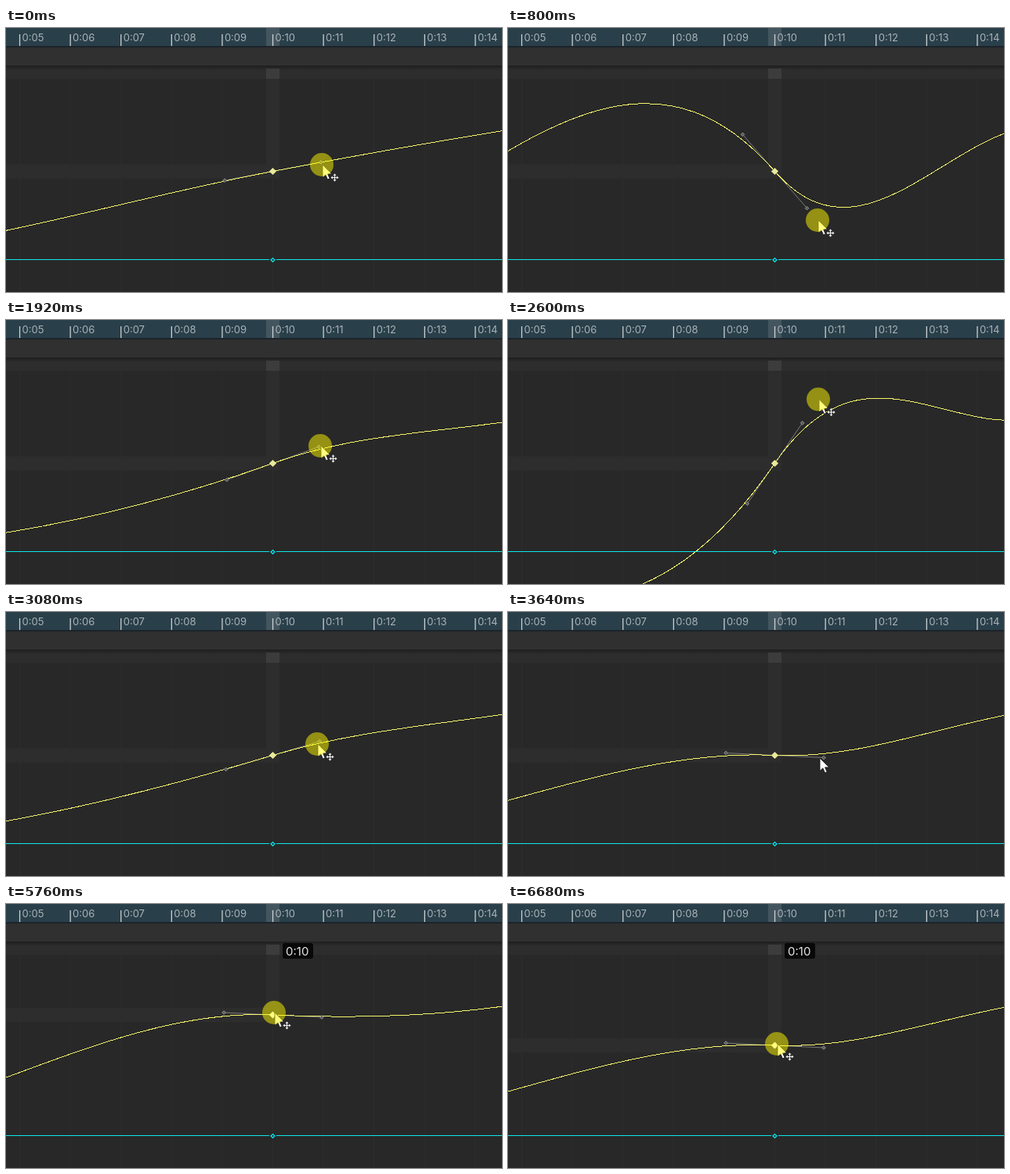
Animation, 633 px wide and 338 px high, one loop 6920 ms. Source, as an HTML page:

```html
<!DOCTYPE html>
<html lang="en">
<head>
<meta charset="utf-8">
<title>Automation curve</title>
<style>
html, body { margin: 0; width: 100%; height: 100%; overflow: hidden; background: #282828; }
svg { display: block; width: 633px; height: 338px; }
text { font-family: Inter, Roboto, sans-serif; }
.thin { fill: none; stroke-width: 1; }
</style>
</head>
<body>
<svg id="stage" viewBox="0 0 633 338" xmlns="http://www.w3.org/2000/svg">
  <defs>
    <linearGradient id="shade" x2="0" y2="1">
      <stop offset="0" stop-color="#1e1e1e"/>
      <stop offset="1" stop-color="#2d2d2d"/>
    </linearGradient>
  </defs>
  <rect width="633" height="338" fill="#282828"/>
  <rect id="row" width="349" height="18" fill="#2d2d2d"/>
  <rect id="col" x="332" y="65" width="17" fill="#2d2d2d"/>
  <g id="grid"></g>
  <rect y="48" width="633" height="17" fill="#2d2d2d"/>
  <rect y="48" width="633" height="6" fill="url(#shade)"/>
  <rect x="332" y="52" width="17" height="13" fill="#3c3c3c"/>
  <rect y="24" width="633" height="24" fill="#303030"/>
  <rect width="633" height="23" fill="#293f4a"/>
  <rect x="332" width="17" height="23" fill="#435660"/>
  <rect y="23" width="633" height="2" fill="#1c2429"/>
  <g id="ruler" font-size="13" fill="#a9b2b7"></g>

  <rect y="296" width="633" height="1" fill="#0ee6ec"/>
  <path d="M335.5 297l5-5 5 5-5 5z" fill="#282828"/>
  <path d="M338 297l2.5-2.5 2.5 2.5-2.5 2.5z" fill="#123c3e" stroke="#0ee6ec" stroke-width="1.2"/>

  <path id="bar" class="thin" stroke="#7c7c7c"/>
  <path id="curve" class="thin" stroke="#f6f66a" shape-rendering="crispEdges"/>
  <g fill="#555" stroke="#999">
    <path id="left" d="M-2.3 0L0-2.3 2.3 0 0 2.3z"/>
    <path id="right" d="M-2.3 0L0-2.3 2.3 0 0 2.3z"/>
  </g>
  <path id="key" d="M-4.6 0L0-4.6 4.6 0 0 4.6z"/>

  <g id="tip">
    <rect x="353" y="50" width="39" height="20" rx="3" fill="#080808"/>
    <text x="357" y="66" font-size="15" fill="#e4e4e4">0:10</text>
  </g>
  <g id="cursor">
    <path d="M1 0v16.5l3.8-3.6 2.7 6 2.7-1.2-2.6-5.8h5.2z" fill="#fff" stroke="#161616" stroke-width=".9"/>
    <g id="move">
      <path d="M16.5 11l2.6 3h-1.7v1.6H19V14l3 2.5-3 2.6v-1.7h-1.6V19h1.7l-2.6 3-2.6-3h1.7v-1.6H14v1.7l-3-2.6 3-2.5v1.6h1.6V14h-1.7z"
            fill="#f4f4f4" stroke="#161616" stroke-width=".6"/>
    </g>
    <circle id="press" r="15" fill="#fffa00" fill-opacity=".5"/>
  </g>
</svg>
<script>
const LOOP = 6920, STEP = 40;
const KEY_X = 340.5, SECOND = 64.6, ARM = 62.5;
const START = { x: KEY_X - 10 * SECOND, y: 297, slope: 0 };
const END = { x: KEY_X + 5 * SECOND, y: 126.7, slope: -0.16 };
const RELEASE = 3640, HOVER = 5000, GRAB = 5200;

// time, cursor x, cursor y, slope at the key, key y
const poses = [
  [0, 403, 175, -.19, 183.5],
  [60, 403, 175, -.19, 183.5],
  [400, 403, 209, .42, 183.5],
  [720, 397, 243, 1.02, 183.5],
  [800, 395, 246, 1.15, 183.5],
  [880, 394.5, 249, 1.21, 183.5],
  [1090, 394.5, 249, 1.21, 183.5],
  [1500, 401, 214, .5, 183.5],
  [1920, 401, 161, -.36, 183.5],
  [2360, 396, 101, -1.48, 183.5],
  [2570, 396, 101, -1.48, 183.5],
  [3080, 397, 169, -.3, 183.5],
  [3280, 397, 181, -.085, 183.5],
  [3400, 397, 181, -.085, 183.5],
  [3480, 397, 187, .048, 183.5],
  [4330, 397, 187, .048, 183.5],
  [4800, 325, 170, .048, 183.5],
  [5080, 340, 182, .048, 183.5],
  [5200, 341, 182, .048, 183.5],
  [5760, 342, 139, .048, 142],
  [5880, 342, 132, .048, 135],
  [6050, 342, 132, .048, 135],
  [6680, 343, 179, .048, 181],
  [LOOP, 343, 179, .048, 181]
];

const $ = id => document.getElementById(id);

function add(parent, tag, attrs, label) {
  const el = document.createElementNS("http://www.w3.org/2000/svg", tag);
  for (const name in attrs) el.setAttribute(name, attrs[name]);
  if (label) el.textContent = label;
  parent.append(el);
}

for (let s = 5; s <= 14; s++) {
  const x = KEY_X + (s - 10) * SECOND;
  add($("grid"), "rect", { x: x - .5, y: 65, width: 1, height: 273, fill: "#2d2d2d" });
  add($("ruler"), "rect", { x: x - .6, y: 8, width: 1.3, height: 15, fill: "#c9cfd2" });
  add($("ruler"), "text", { x: x + 3, y: 16.5 }, "0:" + String(s).padStart(2, "0"));
}

const rate = (i, c) => (poses[i + 1][c] - poses[i][c]) / (poses[i + 1][0] - poses[i][0]);

// Harmonic mean keeps the motion free of overshoot
function tangent(i, c) {
  if (i === 0 || i === poses.length - 1) return 0;
  const a = rate(i - 1, c), b = rate(i, c);
  return a * b > 0 ? 2 * a * b / (a + b) : 0;
}

function sample(t, c) {
  let i = 0;
  while (i < poses.length - 2 && t >= poses[i + 1][0]) i++;
  const p = poses[i], q = poses[i + 1], d = q[0] - p[0], u = (t - p[0]) / d;
  const h = u * u * (3 - 2 * u);
  return p[c] * (1 - h) + q[c] * h
    + d * u * (1 - u) * ((1 - u) * tangent(i, c) - u * tangent(i + 1, c));
}

function segment(a, b) {
  const third = (b.x - a.x) / 3;
  return `C${a.x + third} ${a.y + third * a.slope} ${b.x - third} ${b.y - third * b.slope} ${b.x} ${b.y}`;
}

const place = (id, x, y) => $(id).setAttribute("transform", `translate(${x} ${y})`);
const show = (id, on) => $(id).setAttribute("visibility", on ? "visible" : "hidden");

function draw(t) {
  const [x, y, slope, keyY] = [1, 2, 3, 4].map(c => sample(t, c));
  const key = { x: KEY_X, y: keyY, slope };
  const dx = ARM / Math.hypot(1, slope), dy = dx * slope;

  $("curve").setAttribute("d", `M${START.x} ${START.y}` + segment(START, key) + segment(key, END));
  $("bar").setAttribute("d", `M${KEY_X - dx} ${keyY - dy}L${KEY_X + dx} ${keyY + dy}`);
  place("left", KEY_X - dx, keyY - dy);
  place("right", KEY_X + dx, keyY + dy);
  place("key", KEY_X, keyY);
  $("key").setAttribute("fill", t >= HOVER ? "#fff" : "#e9e99c");
  $("row").setAttribute("y", keyY - 9);
  $("col").setAttribute("height", keyY + 9 - 65);

  place("cursor", x, y);
  show("press", t < RELEASE || t >= GRAB);
  show("move", t < RELEASE || t >= HOVER);
  show("tip", t >= GRAB);
}

const origin = performance.now();
function tick() {
  const t = (performance.now() - origin) % LOOP;
  draw(Math.floor(t / STEP) * STEP);
  requestAnimationFrame(tick);
}
tick();
</script>
</body>
</html>
```
